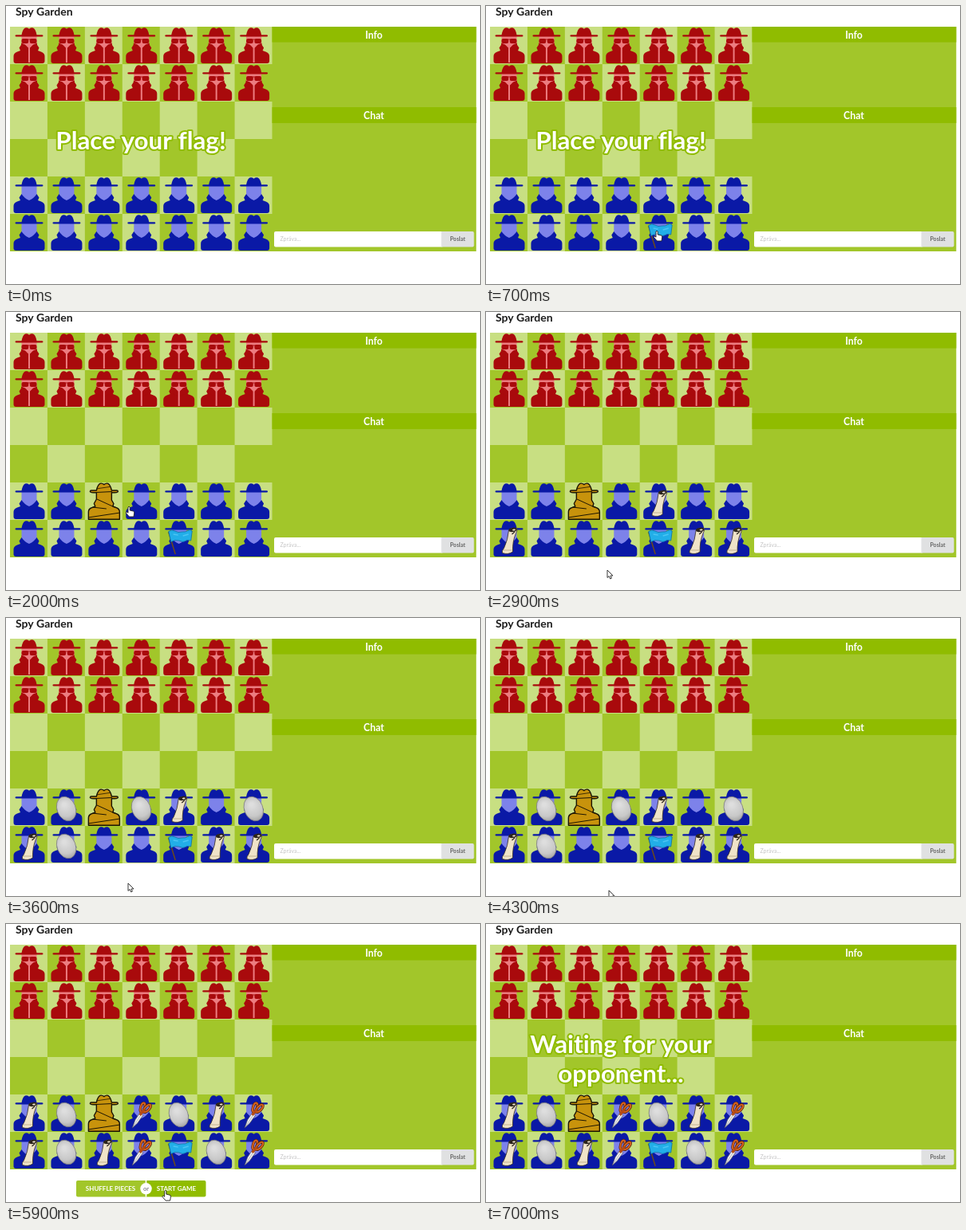
Recreate the animation shown at these times as an HTML page with a canvas. Size 594 by 349 pixels, loop 7100 ms.

```html
<!DOCTYPE html>
<html lang="en">
<head>
<meta charset="utf-8">
<title>Spy Garden</title>
<style>
html, body { margin: 0; width: 100%; height: 100%; overflow: hidden; background: #fff; }
canvas { display: block; width: 594px; height: 349px; }
</style>
</head>
<body>
<canvas id="stage"></canvas>
<script>
const W = 594, H = 349, LOOP = 7100, STEP = 100;
const LEFT = 5, TOP = 26, CELL = 46.93, ROW = 47;
const GREEN = '#a2c62a', LIGHT = '#c8df82', DEEP = '#90bc00';
const FONT = 'Lato, sans-serif';

const canvas = document.getElementById('stage');
const ctx = canvas.getContext('2d');
const ratio = window.devicePixelRatio || 1;
canvas.width = W * ratio;
canvas.height = H * ratio;

// Shapes in the coordinates of one 47 px cell
const HAT = new Path2D('M6.5 11.2Q6.5 10.2 8 10.2H14.5Q16 3 19 1.6Q21.5 .8 24 2.8Q26.5 .8 29 1.6Q32 3 33.5 10.2H40Q41.5 10.2 41.5 11.2Q41.5 12.4 40 12.4H8Q6.5 12.4 6.5 11.2Z');
const FACE = new Path2D('M14.5 12H33.5V24Q31 29 24 31Q17 29 14.5 24Z');
const COAT = new Path2D('M4.5 43V37Q4.5 33 9 31.5L13 30L11.5 26.5L14.5 22Q17.5 27 24 30Q30.5 27 33.5 22L36.5 26.5L35 30L39 31.5Q43.5 33 43.5 37V43Q43.5 46 40.5 46H7.5Q4.5 46 4.5 43Z');
const MASK = new Path2D('M14 20.5L19 22.5L24 27.5L29 22.5L34 20.5V29L24 33L14 29Z');
const DUMMY = new Path2D('M6.5 11.4Q6.5 10 8 10H14.5Q16 3 19 1.4Q21.5 .6 24 2.6Q26.5 .6 29 1.4Q32 3 33.5 10H40Q41.5 10 41.5 11.4Q41 12.8 33.5 12.8V22L36 26.5L35 30L39 31.5Q43.5 33 43.5 37V46.3H4.5V37Q4.5 33 9 31.5L13 30L11.5 26.5L14.5 21V12.8Q7 12.8 6.5 11.4Z');
const CLOTH = new Path2D('M11 14.5Q15 11.5 19 14T28 15Q32 15.5 35 13.5T40.5 14L39 26Q35 24.5 32 26.5T24 26Q19 24.5 14 27.5Z');
const SHEET = new Path2D('M23.5 13Q27 9 33.5 10.5Q35 13 32.5 16.5Q28 27 28.5 40Q23 44 15.5 41.5Q14.5 39 17.5 35.5Q22.5 25 23.5 13Z');
const BLADE = new Path2D('M22 23L26 26L19 36L12.5 42L16 32Z');
const ARROW = new Path2D('M0 0V9.5L2.2 7.6L3.7 11L5.4 10.2L4 7H7Z');
const HAND = new Path2D('M-1 1Q0-.6 1.2 1V5L5.4 6Q7 6.4 6.8 8L6 13H.4L-3.6 8.4Q-3.8 6.7-2.2 7.2L-1 8.2Z');

function shape(path, fill, stroke, width = 1) {
  if (fill) { ctx.fillStyle = fill; ctx.fill(path); }
  if (stroke) { ctx.strokeStyle = stroke; ctx.lineWidth = width; ctx.stroke(path); }
}

function rect(x, y, w, h, fill, radius = 0) {
  ctx.fillStyle = fill;
  ctx.beginPath();
  ctx.roundRect(x, y, w, h, radius);
  ctx.fill();
}

function line(x1, y1, x2, y2, color, width) {
  ctx.strokeStyle = color;
  ctx.lineWidth = width;
  ctx.beginPath();
  ctx.moveTo(x1, y1);
  ctx.lineTo(x2, y2);
  ctx.stroke();
}

function oval(x, y, rx, ry, turn, fill, stroke, width = 1) {
  ctx.beginPath();
  ctx.ellipse(x, y, rx, ry, turn, 0, 7);
  if (fill) { ctx.fillStyle = fill; ctx.fill(); }
  if (stroke) { ctx.strokeStyle = stroke; ctx.lineWidth = width; ctx.stroke(); }
}

function text(str, x, y, size, color, weight = 700, align = 'left') {
  ctx.font = `${weight} ${size}px ${FONT}`;
  ctx.textAlign = align;
  ctx.fillStyle = color;
  ctx.fillText(str, x, y);
}

function at(x, y, draw) {
  ctx.save();
  ctx.translate(x, y);
  draw();
  ctx.restore();
}

const inCell = (c, r, draw) => at(LEFT + c * CELL, TOP + r * ROW, draw);

function blueSpy() {
  shape(FACE, '#7d82ea');
  shape(COAT, '#0a19a6');
  shape(HAT, '#0a19a6');
}

function redSpy() {
  const red = '#a90a0c', pink = '#ec7c80';
  shape(FACE, pink);
  shape(COAT, red);
  shape(MASK, red);
  line(24, 25, 24, 45, pink, 2);
  shape(HAT, red);
  rect(14.5, 15, 8.7, 6, red, 2);
  rect(24.8, 15, 8.7, 6, red, 2);
  line(22, 16, 26, 16, red, 1);
}

const pieces = {
  F() {
    line(11, 15, 19.5, 43, '#6b4a1c', 1.5);
    shape(CLOTH, '#22aee8', '#0d6fa5', .8);
    line(17, 18, 23, 19, '#4cc4f3', 1.5);
    line(29, 20, 36, 18, '#4cc4f3', 1.5);
  },
  T() {
    const ink = '#1c1503';
    shape(DUMMY, '#c8930c', ink, 1.4);
    ctx.save();
    ctx.clip(DUMMY);
    line(14, 8, 34, 5, ink, .8);
    line(14, 12.5, 34, 11.5, ink, 1.2);
    line(13, 20, 37, 31, ink, 1);
    line(9, 31, 27, 33, ink, 1);
    line(4, 44, 44, 38, ink, 1);
    ctx.restore();
  },
  P() {
    shape(SHEET, '#efe3c8', '#3a3020', .8);
    oval(28.5, 12.5, 5.2, 2.6, -.1, '#2b241b');
    oval(30, 12.5, 2, 1, -.1, '#efe3c8');
    line(27.5, 18, 31, 15, '#2b241b', 1.2);
    line(17, 38, 27.5, 38, '#b6a684', .8);
  },
  R() {
    const g = ctx.createRadialGradient(21, 20, 2, 24, 25, 17);
    g.addColorStop(0, '#dedede');
    g.addColorStop(.65, '#c8c8c8');
    g.addColorStop(1, '#a2a2a2');
    oval(23.7, 25.5, 11.6, 15.8, -.38, g, '#7b7b7b', .8);
  },
  S() {
    shape(BLADE, '#ededf0', '#50505a', .7);
    line(23, 26, 14, 40, '#92929b', .6);
    for (const [x, y, turn] of [[25.5, 16.5, .25], [31, 17.5, .75]]) {
      oval(x, y, 2.6, 6, turn, null, '#4a1d08', 3.4);
      oval(x, y, 2.6, 6, turn, null, '#d2601f', 2.2);
    }
    line(22, 26, 28, 18, '#b54a14', 3);
  }
};

const FIRST = 'SRTRPSRPRSSFPP', SHUFFLED = 'PRTSRPSPRPSFRS';
const SHOWN_AT = { F: 800, T: 1700, P: 2600, R: 3600, S: 4600 };
const BUTTONS_AT = 4900, SHUFFLE_AT = 5500, START_AT = 6200;

// time, x, y of the pointer tip
const TRACK = [
  [400, 290, 296], [700, 214, 282], [900, 214, 282], [1300, 168, 258],
  [1600, 122, 240], [1800, 124, 240], [2000, 154, 244], [2200, 156, 262],
  [2400, 157, 299], [2600, 152, 324], [2900, 152, 324], [4300, 154, 342],
  [4800, 148, 342], [5200, 133, 335], [5600, 133, 335], [6000, 212, 334],
  [6300, 212, 334]
];

function pointer(t) {
  for (let i = 1; i < TRACK.length; i++) {
    const [t0, x0, y0] = TRACK[i - 1], [t1, x1, y1] = TRACK[i];
    if (t < t0 || t > t1) continue;
    const k = (t - t0) / (t1 - t0), e = k * k * (3 - 2 * k);
    return { x: x0 + (x1 - x0) * e, y: y0 + (y1 - y0) * e };
  }
  return null;
}

function cellUnder(p) {
  if (!p) return null;
  const c = Math.floor((p.x - LEFT) / CELL), r = Math.floor((p.y - TOP) / ROW);
  return c >= 0 && c < 7 && (r === 4 || r === 5) ? { c, r } : null;
}

function board(t, hover) {
  for (let r = 0; r < 6; r++) {
    for (let c = 0; c < 7; c++) {
      if ((r + c) % 2 === 0) rect(LEFT + c * CELL, TOP + r * ROW, CELL, ROW, LIGHT);
      if (r < 2) inCell(c, r, redSpy);
      if (r > 3) inCell(c, r, blueSpy);
    }
  }
  const layout = t < SHUFFLE_AT ? FIRST : SHUFFLED;
  [...layout].forEach((kind, i) => {
    if (t >= SHOWN_AT[kind]) inCell(i % 7, 4 + Math.floor(i / 7), pieces[kind]);
  });
  if (hover && t < SHOWN_AT.F) inCell(hover.c, hover.r, pieces.F);
  else if (hover && t >= 1000 && t < SHOWN_AT.T && !(hover.c === 4 && hover.r === 5)) {
    inCell(hover.c, hover.r, pieces.T);
  }
}

function panel() {
  rect(333.5, 26, 255.8, 19.5, DEEP);
  rect(333.5, 127, 255.8, 20, DEEP);
  text('Info', 461, 40.5, 12.3, '#fff', 700, 'center');
  text('Chat', 461, 141.5, 12.3, '#fff', 700, 'center');
  rect(336, 283, 212, 19.5, '#fff', 2);
  rect(545.5, 283, 41, 19.5, '#e0e1e2', [0, 2, 2, 0]);
  text('Zpráva...', 343.5, 295.3, 7, '#c6c6c6', 400);
  text('Poslat', 566, 295.3, 7, '#666', 700, 'center');
}

function banner(lines) {
  const base = lines.length > 1 ? 161.7 : 180;
  ctx.lineJoin = 'round';
  ctx.letterSpacing = '0.01px'; // keeps "ti" and "fl" as separate letters
  lines.forEach((str, i) => {
    const y = base + i * 37.5;
    ctx.font = `700 31.3px ${FONT}`;
    ctx.textAlign = 'center';
    ctx.strokeStyle = DEEP;
    ctx.lineWidth = 4;
    ctx.strokeText(str, 169, y);
    text(str, 169, y, 31.3, '#fff', 700, 'center');
  });
  ctx.letterSpacing = '0px';
}

function buttons(p) {
  const over = p && p.y > 322 && p.y < 343;
  rect(88, 322, 87.5, 20.5, over && p.x < 175 ? DEEP : GREEN, [2, 0, 0, 2]);
  rect(175.5, 322, 75, 20.5, over && p.x >= 175 ? DEEP : GREEN, [0, 2, 2, 0]);
  line(175.5, 322, 175.5, 342.5, '#fff', 1.6);
  text('SHUFFLE PIECES', 131, 335.4, 8, '#fff', 700, 'center');
  text('START GAME', 213.5, 335.4, 8, '#fff', 700, 'center');
  oval(175.5, 332.3, 7.2, 7.2, 0, '#fff');
  text('or', 175.5, 334.8, 7.5, '#8a8a8a', 700, 'center');
}

function draw(t) {
  ctx.setTransform(ratio, 0, 0, ratio, 0, 0);
  rect(0, 0, W, H, '#fff');
  text('Spy Garden', 12, 12, 14, '#1c1c1c');
  rect(LEFT, TOP, 584.3, 282, GREEN);
  const p = pointer(t), hover = cellUnder(p);
  board(t, hover);
  panel();
  if (t < SHOWN_AT.F) banner(['Place your flag!']);
  else if (t >= 900 && t < SHOWN_AT.T) banner(['Place your trap!']);
  else if (t >= START_AT) banner(['Waiting for your', 'opponent...']);
  const active = t >= BUTTONS_AT && t < START_AT;
  if (active) buttons(p);
  if (p) {
    const hand = hover || (active && p.y > 322 && p.y < 343);
    at(p.x, p.y, () => shape(hand ? HAND : ARROW, '#fff', '#222', .9));
  }
}

function tick() {
  draw(Math.floor((performance.now() % LOOP) / STEP) * STEP);
  requestAnimationFrame(tick);
}
tick();
</script>
</body>
</html>
```
